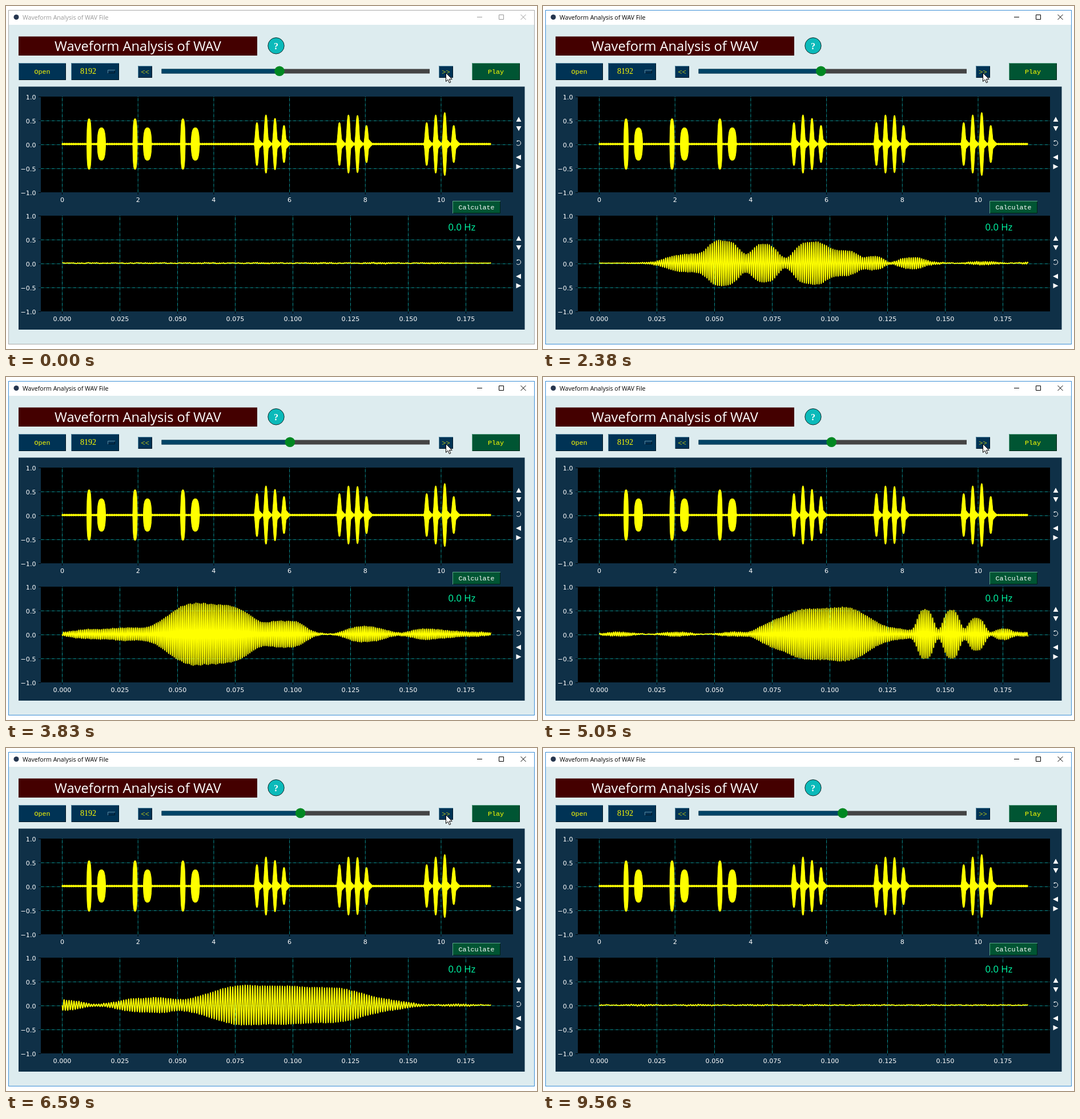
An HTML page that plays this animation: 930x602 px, repeating every 9.62 s.

```html
<!DOCTYPE html>
<html lang="en">
<head>
<meta charset="utf-8">
<title>Waveform Analysis</title>
<style>
  html, body { margin: 0; width: 100%; height: 100%; overflow: hidden; background: #fff; }
  svg { display: block; width: 930px; height: 602px; }
  .ui { font: 10.6px "Open Sans", "Noto Sans", sans-serif; }
  .heading { font: 23.6px "Open Sans", "Noto Sans", sans-serif; }
  .hertz { font: 16.6px "Open Sans", "Noto Sans", sans-serif; }
  .label { font: 11.7px "Liberation Mono", monospace; }
  .digits { font: 14px "Liberation Serif", serif; }
  .chevrons { font: 13px "Liberation Serif", serif; }
  .tick { font: 11.1px "DejaVu Sans", sans-serif; }
  .help { font: bold 16px "Liberation Serif", serif; }
</style>
</head>
<body>
<svg id="stage" viewBox="0 0 930 602" xmlns="http://www.w3.org/2000/svg"></svg>
<script>
const LOOP = 9620, UNIT = 84, LEFT = 98.5, RIGHT = 849.5;
const PX_PER_SECOND = 4040, STEP_SECONDS = 0.0327, STEP_PIXELS = 1.31;
const CURSOR_LEAVES = 9130, CURSOR_MOVES = 7, CURSOR_MOVE_TIME = 71;
const range = n => [...Array(n).keys()];

// Each click moves the lower window one step on. Runs of even clicks: start, count, gap.
const clicks = [[400, 2, 600], [1460, 2, 330], [1980, 2, 400], [2570, 5], [3450, 5],
  [4470, 2, 200], [4860, 4], [5630, 2, 200], [6020, 5], [7040, 2], [7350, 2, 400], [8010, 2, 260]]
  .flatMap(([start, count, gap = 190]) => range(count).map(i => start + i * gap));

// The button is held longer while the clicking is slow.
function isPressed(t, step) {
  if (step === clicks.length) return false;
  const gap = clicks[step] - (clicks[step - 1] ?? 0);
  return t >= clicks[step] - (gap > 300 ? 200 : 130);
}

// Four notes, each a pitch and a few swells: centre in ms, strength, half-width in ms.
const notes = [
  { end: 0.44, pitch: 1090, swells: [[234, .17, 12], [250.5, .45, 8], [268, .38, 7], [287, .4, 8],
    [301, .26, 9], [316, .11, 4.5], [331, .1, 6.5]] },
  { end: 0.645, pitch: 1220, swells: [[478, .1, 14], [521, .62, 22], [555, .24, 9], [590, .12, 11], [620, .08, 11]] },
  { end: 0.9, pitch: 1200, swells: [[727, .1, 6], [752, .53, 22], [776, .06, 15],
    ...[.49, .48, .31, .1].map((strength, i) => [795.5 + 11.1 * i, strength, 4.2])] },
  { end: 2, pitch: 930, swells: [[918, .08, 9], [952, .14, 12], [985, .14, 18], [1018, .37, 36]] }
];
const swells = notes.flatMap(note => note.swells);
const bump = (distance, width) => Math.exp(-(Math.abs(distance / width) ** 3));

function loudness(t) {
  const echo = 0.04 * Math.sin(Math.PI * t / 0.025) ** 2 * bump(t - 0.66, 0.46);
  return swells.reduce((sum, [centre, strength, width]) =>
    sum + strength * bump(t * 1000 - centre, width), echo + 0.003);
}

function sound(t) {
  const { pitch } = notes.find(note => t < note.end);
  const hush = 1 - 0.85 * bump(t - 0.19, 0.028);
  const hum = Math.sin(620 * t) + Math.sin(1730 * t + 1) + Math.sin(2990 * t + Math.sin(900 * t));
  return loudness(t) * hush * Math.sin(2 * Math.PI * pitch * t) + 0.003 * hush * hum;
}

function detailPath(step) {
  const points = [];
  for (let x = 0; x <= RIGHT - LEFT; x += 0.25) {
    const y = 451.3 - UNIT * sound(step * STEP_SECONDS + x / PX_PER_SECOND);
    points.push((LEFT + x).toFixed(2) + " " + y.toFixed(2));
  }
  return "M" + points.join("L");
}

// Whole recording: three pairs of round calls, then three four-note songs.
const calls = [145.5, 226, 309.8].flatMap(x => [[x, 0.53, 4], [x + 21.7, 0.34, 7.2]]);
const chirps = [439.5, 584, 736.8].flatMap((x, song) =>
  [0.45, 0.61, 0.54 + 0.06 * song, 0.39].map((strength, i) => [x + 15.8 * i, strength]));

function overviewHeight(x) {
  const noise = 0.017 + 0.005 * Math.sin(x * 2.3) * Math.sin(x * 0.71);
  const callHeights = calls.map(([centre, strength, width]) =>
    strength * Math.sqrt(Math.max(0, 1 - Math.abs((x - centre) / width) ** 3)));
  const chirpHeights = chirps.map(([centre, strength]) => {
    const d = x - centre;
    const skirt = 0.13 * Math.exp(-((d / (d < 0 ? 4 : 7.5)) ** 2));
    return Math.max(skirt, strength * bump(d, 3.3));
  });
  return UNIT * Math.max(noise, ...callHeights, ...chirpHeights);
}

function overviewPath() {
  const upper = [], lower = [];
  for (let x = 98; x <= 849; x += 0.5) {
    const h = overviewHeight(x);
    upper.push(`${x} ${(242.3 - h).toFixed(1)}`);
    lower.unshift(`${x} ${(242.3 + h).toFixed(1)}`);
  }
  return "M" + upper.concat(lower).join("L") + "Z";
}

const rect = (x, y, r, b, fill, more = "") =>
  `<rect x="${x}" y="${y}" width="${r - x}" height="${b - y}" fill="${fill}" ${more}/>`;
const path = (d, stroke, more = "") => `<path d="${d}" fill="none" stroke="${stroke}" ${more}/>`;
const text = (x, y, str, kind, fill, anchor = "start") =>
  `<text x="${x}" y="${y}" class="${kind}" fill="${fill}" text-anchor="${anchor}">${str}</text>`;

const blue = ["#003355", "#5b8ba3", "#001523"], green = ["#005533", "#5aa386", "#002215"];
const sunken = ["#ebeeee", "#8a8a8a", "#fff"];

function button(x, y, r, b, [face, light, dark]) {
  return rect(x, y, r, b, face)
    + path(`M${x + .5} ${b}V${y + .5}H${r}`, light)
    + path(`M${x + 1} ${b - .5}H${r - .5}V${y + 1}`, dark);
}
const labelled = (x, y, r, b, colours, str, kind = "label", fill = "#ff0") =>
  button(x, y, r, b, colours) + text((x + r) / 2, (y + b) / 2 + 4, str, kind, fill, "middle");

function plot(top, xs, xLabels) {
  const mid = top + 83.5, bottom = top + 168;
  let out = rect(61, top, 888, bottom, "#000"), grid = "", ticks = "";
  xs.forEach((x, i) => {
    grid += `M${x} ${bottom}V${top}`;
    ticks += `M${x} ${bottom}v4`;
    out += text(x, bottom + 17, xLabels[i], "tick", "#fff", "middle");
  });
  ["1.0", "0.5", "0.0", "−0.5", "−1.0"].forEach((label, i) => {
    const y = top + 42 * i + .5;
    if (i % 4) grid += `M61 ${y}H888`;
    ticks += `M57 ${y}h4`;
    out += text(52.5, y + 4, label, "tick", "#fff", "end");
  });
  out += path(grid, "#0a8f92", 'stroke-dasharray="5.6 1.4 1 1.4"') + path(ticks, "#000");
  const arrows = `M898 ${mid - 48}l4.5 8.5h-9zM898 ${mid - 23}l4.5 -8.5h-9z`
    + `M893 ${mid + 23}l9 -4.5v9zM902.5 ${mid + 39.5}l-9 -4.5v9z`;
  return out + `<path d="${arrows}" fill="#fff"/>`
    + path(`M894.5 ${mid - 5.2}A4.3 4.3 0 1 1 894 ${mid + .8}M894.5 ${mid - 5.2}h2.6`, "#fff");
}

document.getElementById("stage").innerHTML =
  rect(4.5, 7.5, 925.5, 593.5, "#ddecef", 'id="frame"')
  + rect(5, 8, 925, 33, "#fff")
  + '<circle cx="18" cy="19.5" r="4.5" fill="#26364f"/>'
  + `<g id="title">${text(29, 23.5, "Waveform Analysis of WAV File", "ui", "inherit")}</g>`
  + path("M825 19.5h9M863.5 15.5h8v8h-8zM901.5 15l9 9M910.5 15l-9 9", "#000", 'id="controls"')
  + rect(22, 53.5, 440, 87, "#440000")
  + text(231, 79, "Waveform Analysis of WAV", "heading", "#fff", "middle")
  + '<circle cx="473" cy="69.8" r="14.2" fill="#0bbaba" stroke="#1a2a2a"/>'
  + text(473, 75.5, "?", "help", "#fff", "middle")
  + labelled(22, 100, 105, 130, blue, "Open")
  + button(114, 100, 198, 130, blue) + text(144, 119, "8192", "digits", "#ff0", "middle")
  + button(178, 112, 191, 118, blue)
  + labelled(231, 105, 256, 126, blue, "&lt;&lt;", "chevrons")
  + rect(272.5, 110.5, 742, 118.5, "#444") + rect(272.5, 110.5, 479, 118.5, "#004466", 'id="played"')
  + '<circle id="knob" cy="114.3" r="8.8" fill="#008822"/>'
  + `<g id="nextUp">${labelled(758, 105, 783, 126, blue, "&gt;&gt;", "chevrons")}</g>`
  + `<g id="nextDown">${labelled(758, 105, 783, 126, sunken, "&gt;&gt;", "chevrons", "#000")}</g>`
  + labelled(816, 100, 900, 130, green, "Play")
  + rect(22, 141.5, 908.5, 568, "#0f3047")
  + plot(159, range(6).map(i => LEFT + 132.7 * i), range(6).map(i => 2 * i))
  + plot(368, range(8).map(i => LEFT + 101 * i), range(8).map(i => (i * 0.025).toFixed(3)))
  + `<path d="${overviewPath()}" fill="#ff0" stroke="#ff0" stroke-linejoin="round"/>`
  + labelled(782, 342, 866, 364, green, "Calculate", "label", "#fff")
  + rect(770, 378, 828, 400, "#000") + text(774.5, 394, "0.0 Hz", "hertz", "#00ffaa")
  + path("", "#ff0", 'id="detail" stroke-width="1.8" stroke-linejoin="round"')
  + '<path id="cursor" d="M.5 .5V15.5l3.5 -3.3 2.4 5.6 2.4 -1 -2.4 -5.4h4.8z" fill="#fff" stroke="#000"/>';

const [frame, title, controls, played, knob, nextUp, nextDown, detail, cursor] =
  ["frame", "title", "controls", "played", "knob", "nextUp", "nextDown", "detail", "cursor"]
    .map(id => document.getElementById(id));
const show = (node, visible) => node.setAttribute("visibility", visible ? "visible" : "hidden");
let drawnStep = -1;

function draw() {
  const t = performance.now() % LOOP;
  const step = clicks.filter(time => time <= t).length;
  if (step !== drawnStep) {
    detail.setAttribute("d", detailPath(step));
    const x = 479 + step * STEP_PIXELS;
    knob.setAttribute("cx", x);
    played.setAttribute("width", x - 272.5);
    drawnStep = step;
  }
  const active = t >= 200;
  frame.setAttribute("stroke", active ? "#3c8fd6" : "#aaa");
  title.setAttribute("fill", active ? "#000" : "#999");
  controls.setAttribute("stroke", active ? "#000" : "#999");

  const pressed = isPressed(t, step);
  show(nextUp, !pressed);
  show(nextDown, pressed);

  const moves = Math.max(0, Math.floor((t - CURSOR_LEAVES) / CURSOR_MOVE_TIME) + 1);
  const k = moves / CURSOR_MOVES;
  cursor.setAttribute("transform", `translate(${770 + 160 * k} ${117 - 19 * Math.sin(k * Math.PI / 2)})`);
  show(cursor, k < 1);
  requestAnimationFrame(draw);
}
draw();
</script>
</body>
</html>
```
